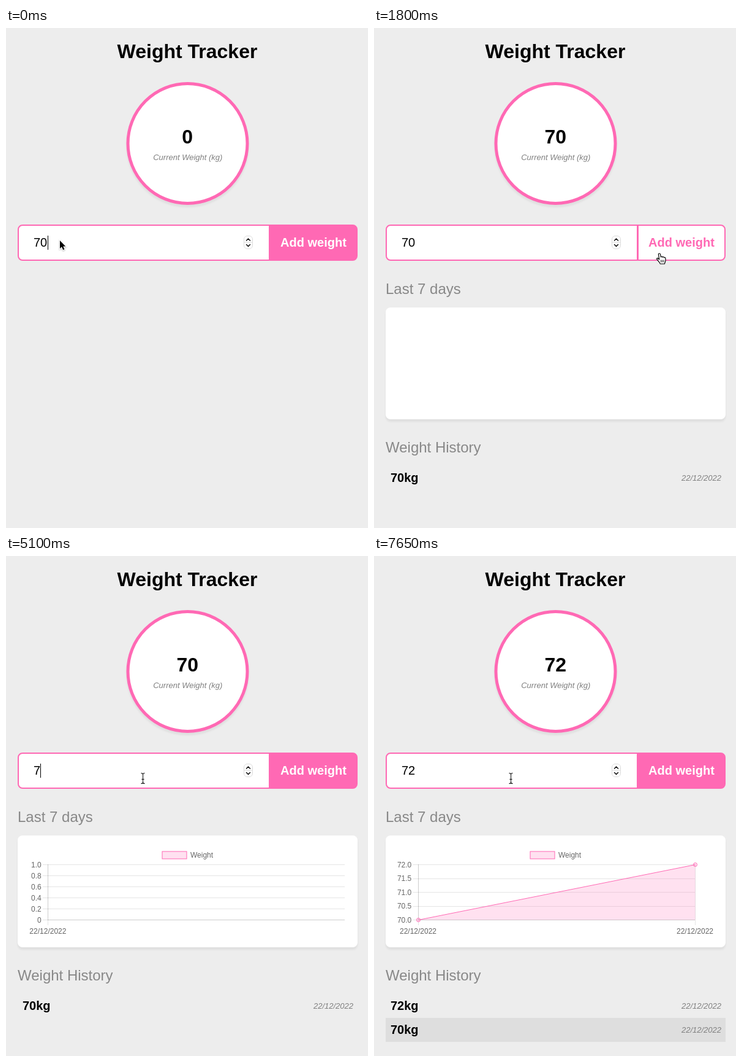
Recreate the animation shown at these times as an HTML page. Size 591 by 814 pixels, loop 8000 ms.

```html
<!DOCTYPE html>
<html lang="en">
<head>
<meta charset="utf-8">
<title>Weight Tracker</title>
<style>
  html, body { margin: 0; width: 100%; height: 100%; overflow: hidden; background: #ededed; }
  svg { display: block; width: 591px; height: 814px; font-family: "Liberation Sans", Arial, sans-serif; }
  :root { --pink: #ff69b4; --tint: rgba(255, 105, 180, .2); }

  .mid { text-anchor: middle; }
  .end { text-anchor: end; }
  .title { font: bold 32px "Liberation Sans", Arial, sans-serif; text-anchor: middle; }
  .bold { font-size: 20px; font-weight: bold; }
  .field { font-size: 20px; }
  .head { font-size: 24px; fill: #888; }
  .note { font-size: 13px; font-style: italic; fill: #808080; }
  .axis { font-size: 12px; fill: #666; }
  .grid { fill: none; stroke: rgba(0, 0, 0, .1); }
  .shade { filter: drop-shadow(0 4.5px 1.5px rgba(0, 0, 0, .055)); }

  /* One 8 s clock; every change is a hard step on a 150 ms beat (1.875 %). */
  .t { animation: 8s step-end -8ms infinite; }
  .hide { opacity: 0; }

  .zero { animation-name: zero; }
  @keyframes zero { 0% { opacity: 1 } 22.5% { opacity: 0 } }
  .saved { animation-name: saved; }
  @keyframes saved { 22.5% { opacity: 1 } }
  .first { animation-name: first; }
  @keyframes first { 22.5% { opacity: 1 } 76.875% { opacity: 0 } }
  .second { animation-name: second; }
  @keyframes second { 76.875% { opacity: 1 } }

  .in70 { animation-name: in70; }
  @keyframes in70 { 0% { opacity: 1 } 63.75% { opacity: 0 } }
  .in7 { animation-name: in7; }
  @keyframes in7 { 63.75% { opacity: 1 } 65.625% { opacity: 0 } }
  .in72 { animation-name: in72; }
  @keyframes in72 { 65.625% { opacity: 1 } }
  .select { animation-name: select; }
  @keyframes select { 45% { opacity: 1 } 63.75% { opacity: 0 } }

  .caret { animation-name: caret; }
  @keyframes caret {
    0%, 11.25%, 37.5%, 76.875%, 90% { opacity: 1; transform: translateX(0) }
    63.75% { opacity: 1; transform: translateX(-12px) }
    65.625% { opacity: 1; transform: translateX(0) }
    5.625%, 16.875%, 41.25%, 71.25%, 82.5%, 95.625% { opacity: 0; transform: translateX(0) }
  }

  .btn { fill: var(--pink); animation-name: btn; }
  @keyframes btn {
    16.875% { fill: #ffd2e8 }
    18.75% { fill: #fff }
    30% { fill: #ffe4f1 }
    31.875% { fill: #ff7cbe }
    33.75% { fill: #ff69b4 }
  }
  .label { fill: #fff; animation-name: label; }
  @keyframes label {
    16.875% { fill: #ff96cb }
    18.75% { fill: #ff69b4 }
    30% { fill: #ff81c0 }
    31.875% { fill: #ffebf5 }
    33.75% { fill: #fff }
  }

  .plot1 { animation-name: plot1; }
  @keyframes plot1 { 28.125% { opacity: 1 } 78.75% { opacity: 0 } }
  .legend { animation-name: legend; }
  @keyframes legend { 28.125% { opacity: 1 } }
  .plot2 { animation-name: plot2; }
  @keyframes plot2 { 78.75% { opacity: 1 } }

  /* ease-out quart rise of the data, sampled on the beat */
  .rise { transform-origin: 72px 592.5px; animation-name: rise; }
  @keyframes rise {
    78.75% { transform: scaleY(.28) }
    80.625% { transform: scaleY(.645) }
    82.5% { transform: scaleY(.85) }
    84.375% { transform: scaleY(.95) }
    86.25% { transform: scaleY(.99) }
    88.125% { transform: scaleY(1) }
  }
  .lift { animation-name: lift; }
  @keyframes lift {
    78.75% { transform: translateY(65px) }
    80.625% { transform: translateY(32px) }
    82.5% { transform: translateY(13.5px) }
    84.375% { transform: translateY(4.5px) }
    86.25% { transform: translateY(1px) }
    88.125% { transform: translateY(0) }
  }
  .ink { animation-name: ink; }
  @keyframes ink {
    82.5% { opacity: .17 }
    84.375% { opacity: .33 }
    86.25% { opacity: .5 }
    88.125% { opacity: .67 }
    90% { opacity: .83 }
    91.875% { opacity: 1 }
  }

  .mouse { animation-name: mouse; }
  @keyframes mouse {
    0% { transform: translate(88px, 346px) }
    11.25% { transform: translate(98px, 348px) }
    13.125% { transform: translate(170px, 356px) }
    15% { transform: translate(320px, 367px) }
    16.875% { transform: translate(452px, 367px) }
    18.75% { transform: translate(466px, 367px) }
    28.125% { transform: translate(446px, 370px) }
    30% { transform: translate(341px, 379px) }
    31.875% { transform: translate(262px, 371px) }
    33.75% { transform: translate(231px, 364px) }
    35.625%, 100% { transform: translate(223.5px, 362px) }
  }
  .arrow { animation-name: arrow; }
  @keyframes arrow { 0%, 30% { opacity: 1 } 13.125%, 31.875% { opacity: 0 } }
  .beam { animation-name: beam; }
  @keyframes beam { 13.125%, 31.875% { opacity: 1 } 16.875% { opacity: 0 } }
  .hand { animation-name: hand; }
  @keyframes hand { 16.875% { opacity: 1 } 30% { opacity: 0 } }
</style>
</head>
<body>
<svg viewBox="0 0 591 814">
  <text class="title" x="296" y="49">Weight Tracker</text>

  <circle class="shade" cx="296.5" cy="188" r="97.5" fill="#fff" stroke="#ff69b4" stroke-width="5"/>
  <text class="title t hide zero" x="296.2" y="188">0</text>
  <text class="title t hide first" x="296.2" y="188">70</text>
  <text class="title t hide second" x="296.2" y="188">72</text>
  <text class="note mid" x="296.8" y="215">Current Weight (kg)</text>

  <!-- form -->
  <rect x="20" y="321" width="553" height="57" rx="7" fill="#fff"/>
  <path class="t btn" d="M430 321H566a7 7 0 0 1 7 7V371a7 7 0 0 1-7 7H430Z"/>
  <rect x="20" y="321" width="553" height="57" rx="7" fill="none" stroke="#ff69b4" stroke-width="2"/>
  <rect x="429" y="321" width="3" height="57" fill="#ff69b4"/>
  <text class="bold mid t label" x="502" y="356">Add weight</text>
  <rect class="t hide select" x="45" y="338" width="23" height="23" fill="#b3d7ff"/>
  <g class="field">
    <text class="t hide in70" x="45" y="356">70</text>
    <text class="t hide in7" x="45" y="356">7</text>
    <text class="t hide in72" x="45" y="356">72</text>
  </g>
  <rect class="t caret" x="68" y="338" width="1" height="23"/>
  <g fill="none">
    <rect x="388.5" y="338.5" width="14" height="21" rx="5.5" stroke="#dcdcdc"/>
    <path d="M389 349H402" stroke="#dcdcdc"/>
    <path d="M392.5 346l3-3 3 3M392.5 352.5l3 3 3-3" stroke="#111" stroke-width="1.5" stroke-linecap="round" stroke-linejoin="round"/>
  </g>

  <!-- chart card and history -->
  <g class="t hide saved">
    <text class="head" x="19" y="433">Last 7 days</text>
    <rect class="shade" x="19" y="455" width="555" height="182" rx="8" fill="#fff"/>
    <text class="head" x="19" y="691">Weight History</text>
    <text class="note end" x="567" y="737">22/12/2022</text>
  </g>
  <text class="bold t hide first" x="27" y="739">70kg</text>
  <g class="t hide second">
    <rect x="19" y="752" width="555" height="39" fill="#dedede"/>
    <text class="bold" x="27" y="739">72kg</text>
    <text class="bold" x="27" y="778">70kg</text>
    <text class="note end" x="567" y="776">22/12/2022</text>
  </g>

  <g class="t hide legend">
    <rect x="255" y="481" width="40" height="12" fill="var(--tint)" stroke="#ff69b4"/>
    <text class="axis" x="301" y="491">Weight</text>
  </g>

  <g class="t hide plot1">
    <path class="grid" d="M60 502.5H553M60 520.5H553M60 538.5H553M60 556.5H553M60 574.5H553M60 592.5H553M68.5 502V601"/>
    <path class="grid" d="M68.5 502V593M68 592.5H553"/>
    <g class="axis end">
      <text x="57.8" y="507">1.0</text>
      <text x="57.8" y="525">0.8</text>
      <text x="57.8" y="543">0.6</text>
      <text x="57.8" y="561">0.4</text>
      <text x="57.8" y="579">0.2</text>
      <text x="57.8" y="597">0</text>
    </g>
    <text class="axis mid" x="68.4" y="615">22/12/2022</text>
  </g>

  <g class="t hide plot2">
    <path class="grid" d="M64 502.5H524M64 525.5H524M64 547.5H524M64 570.5H524M64 592.5H524M72.5 502V601M524.5 502V601"/>
    <g class="axis end">
      <text x="61.3" y="507">72.0</text>
      <text x="61.3" y="529">71.5</text>
      <text x="61.3" y="552">71.0</text>
      <text x="61.3" y="574">70.5</text>
      <text x="61.3" y="597">70.0</text>
    </g>
    <g class="axis mid">
      <text x="72" y="615">22/12/2022</text>
      <text x="524" y="615">22/12/2022</text>
    </g>
    <path class="t rise" d="M72.5 592.5L524.5 502.5V592.5Z" fill="var(--tint)"/>
    <path class="grid" d="M72.5 502V593M72 592.5H524"/>
    <g class="t hide ink" stroke="#ff69b4" fill="var(--tint)">
      <path class="t rise" d="M72.5 592.5L524.5 502.5" vector-effect="non-scaling-stroke"/>
      <circle cx="72.5" cy="592.5" r="3"/>
      <circle class="t lift" cx="524.5" cy="502.5" r="3"/>
    </g>
  </g>

  <!-- pointer -->
  <g class="t mouse">
    <path class="t hide arrow" d="M0 0V13L3 10.3L5.2 15.2L7.5 14.2L5.3 9.4H9.3Z" stroke="#fff" stroke-width="2" paint-order="stroke" style="filter:drop-shadow(0 1px .8px rgba(0,0,0,.3))"/>
    <g class="t hide beam" fill="none">
      <path d="M-3-8.5Q0-8.5 0-6.5Q0-8.5 3-8.5M0-6.5V6.5M-3 8.5Q0 8.5 0 6.5Q0 8.5 3 8.5M-2 1.5H2" stroke="#fff" stroke-width="2.4"/>
      <path d="M-3-8.5Q0-8.5 0-6.5Q0-8.5 3-8.5M0-6.5V6.5M-3 8.5Q0 8.5 0 6.5Q0 8.5 3 8.5M-2 1.5H2" stroke="#000" stroke-width="1.1"/>
    </g>
    <g class="t hide hand" stroke="#000" stroke-linejoin="round" stroke-linecap="round">
      <path d="M-1.6 1.5C-1.8-.4 1.2-.5 1.5 1.4L2.4 6C2.7 4.6 4.8 4.7 5 6.2C5.4 5 7.4 5.3 7.6 7C8 6 10 6.4 10 8.2V11.5C10 13.6 8.6 14.6 8.4 17H1.2C.8 15-1.4 13.2-3 10.8C-5.6 8.4-3.8 6.8-2 8.2L-.3 9.8Z" fill="#fff" stroke-width="1.2"/>
      <path d="M2.6 11V14M4.8 11V14M7 11V14" stroke-width=".9"/>
    </g>
  </g>
</svg>
</body>
</html>
```
